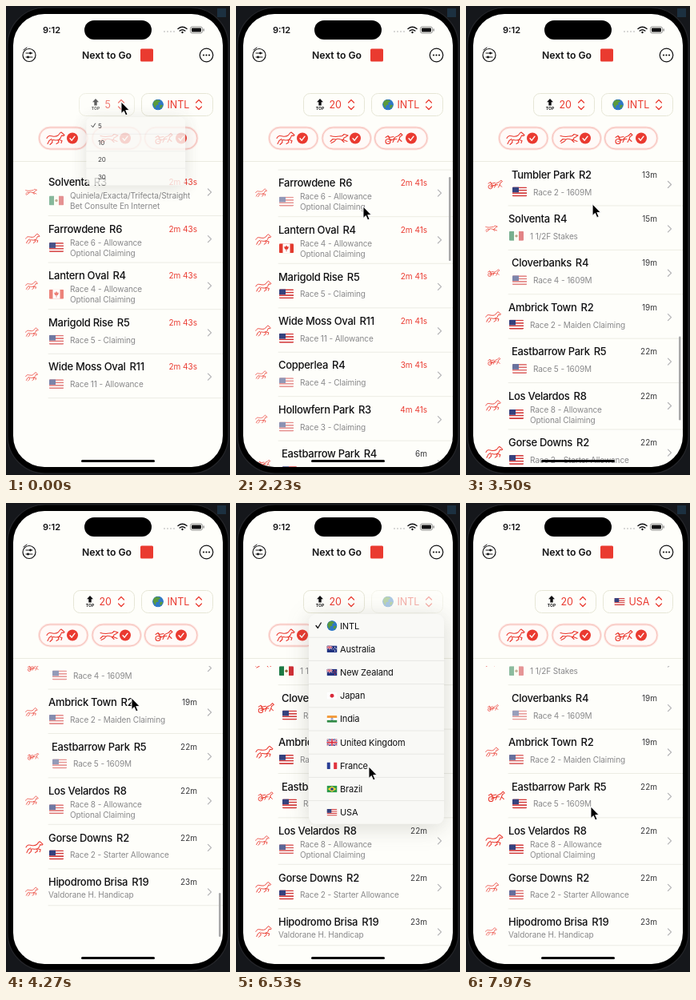
An HTML page that plays this animation: 280 by 587 pixels, repeating every 8 s.

```html
<!DOCTYPE html>
<html lang="en">
<head>
<meta charset="utf-8">
<title>Next to Go</title>
<style>
html, body { margin: 0; width: 100%; height: 100%; overflow: hidden; background: #000; }
svg { display: block; width: 280px; height: 587px; font-family: Inter, Roboto, sans-serif; }
.menu { filter: drop-shadow(0 4px 14px rgba(70, 70, 60, .2)); }
.line { fill: none; stroke-linecap: round; stroke-linejoin: round; }
</style>
</head>
<body>
<svg id="stage" viewBox="0 0 280 587"></svg>
<script>
const LOOP = 8000, PAPER = '#fefefa', INK = '#101012', RED = '#ea3a30', GREY = '#88888a';
const clamp = (v, a = 0, b = 1) => Math.min(b, Math.max(a, v));
const smooth = p => { p = clamp(p); return p * p * (3 - 2 * p); };
const easeOut = p => 1 - (1 - clamp(p)) ** 3;

// ---- drawing helpers ----
const text = (x, y, size, str, attrs = '') =>
  `<text x="${x}" y="${(y + size * .36).toFixed(2)}" font-size="${size}" ${attrs}>${str}</text>`;
const rect = (x, y, w, h, fill, attrs = '') =>
  `<rect x="${x}" y="${y}" width="${w}" height="${h}" fill="${fill}" ${attrs}/>`;
const circle = (x, y, r, fill, attrs = '') => `<circle cx="${x}" cy="${y}" r="${r}" fill="${fill}" ${attrs}/>`;
const line = (d, color, width = 1, attrs = '') =>
  `<path class="line" d="${d}" stroke="${color}" stroke-width="${width}" ${attrs}/>`;
const group = (x, y, body, attrs = '') => `<g transform="translate(${x} ${y})" ${attrs}>${body}</g>`;

// Flags are 18 x 12, centred on the origin.
const bars = (colors, upright) => colors.map((c, i) => {
  const n = colors.length;
  return upright ? rect(-9 + i * 18 / n, -6, 18 / n + .05, 12, c) : rect(-9, -6 + i * 12 / n, 18, 12 / n + .05, c);
}).join('');
const jack = rect(-9, -6, 18, 12, '#25358a') +
  line('M-9-6L9 6M9-6L-9 6', '#fff', 2.6) + line('M-9-6L9 6M9-6L-9 6', '#d8283a', 1) +
  line('M0-6V6M-9 0H9', '#fff', 4) + line('M0-6V6M-9 0H9', '#d8283a', 2.2);
const ensign = star => rect(-9, -6, 18, 12, '#1f3280') +
  `<g transform="translate(-4.5 -3) scale(.5)">${jack}</g>` +
  circle(5, -3, 1, star) + circle(3, 0, .9, star) + circle(7, -.5, .9, star) + circle(5, 3.5, 1, star);
const FLAGS = {
  us: bars('#d33a3a #fff #d33a3a #fff #d33a3a #fff #d33a3a'.split(' ')) + rect(-9, -6, 8, 6.8, '#34417e'),
  mx: bars(['#1c7a45', '#fbfbf0', '#cf2f35'], true) + circle(0, 0, 1.7, '#8a6a3a'),
  ca: rect(-9, -6, 18, 12, '#e23a2e') + rect(-4.5, -6, 9, 12, '#fff') +
    '<path d="M0-4L1-2 3-2 2 1 .4 1.6V4H-.4V1.6L-2 1-3-2-1-2Z" fill="#e23a2e"/>',
  ar: bars(['#7fb6e0', '#fff', '#7fb6e0']) + circle(0, 0, 1.5, '#e8b13a'),
  au: ensign('#fff'),
  nz: ensign('#e0404a'),
  jp: rect(-9, -6, 18, 12, '#fff') + circle(0, 0, 3.4, '#d92a3a'),
  in: bars(['#f39a3a', '#fff', '#2f8a45']) + circle(0, 0, 1.6, 'none', 'stroke="#2a3a90" stroke-width=".8"'),
  gb: jack,
  fr: bars(['#2b3f95', '#fff', '#e0343f'], true),
  br: rect(-9, -6, 18, 12, '#2c9a4a') + '<path d="M0-4.8L7.5 0 0 4.8-7.5 0Z" fill="#f4d33a"/>' + circle(0, 0, 2.6, '#2a3f90'),
  intl: circle(0, 0, 9, '#2f78c8') +
    '<path d="M-6-6C-2-9 3-8 4-5L0-3 1 0-3 1-4 6-7 2-8-2ZM4 0L8 1 5 6 2 4Z" fill="#5a9a3c"/>'
};
const flag = (code, x, y, scale = 1, attrs = '') =>
  `<g ${attrs}><g transform="translate(${x} ${y}) scale(${scale})" clip-path="url(#${code === 'intl' ? 'disc' : 'cloth'})">${FLAGS[code]}</g></g>`;

// Animals are drawn 24 wide, 16 high.
const ANIMALS = {
  horse: 'M1 8C3 4 5 5 8 5.5C11 6 13 6 15 4.5L18 1 19 .5 23 4 22 5 19.5 4.6 18 8 16 10 20 11 19 14M16 10L13 10.5C10 10.5 9 9.5 7.5 10.5L8 13 5 16M7 9L4 11 2 15M15 10L16 13 13 15',
  dog: 'M1 5C4 6 5 6 8 6C11 5 13 6 16 5L18 3 23 4.5 20 6.5 18 7.5 17 10 22 12M17 10L14 9.5C12 9 10 8 8 9.5L4 9 1 12M8 9.5L6 12 2 14M15 10L18 13',
  sulky: 'M9 12A3 3 0 1 1 3 12A3 3 0 1 1 9 12M6 12L14 9H17M3 7L6 5 8 9 11 10M6 5L8 7 13 6M13 9C14 6 17 6 19 5L22 2 24 4 21 6 20 9 23 12M14 9L12 13M20 9L18 13'
};
const animal = (kind, width = 1) => group(0, -8, line(ANIMALS[kind], RED, width));
const arrows = x => line(`M${x - 3.5} 121l3.5-3.5 3.5 3.5M${x - 3.5} 126l3.5 3.5 3.5-3.5`, RED, 1.2);

// ---- list rows: name, race, animal, flag, time, lines, pulse seconds, pulse degrees ----
const ROWS = [
  ['Solventa', 'R3', 'dog', 'mx', 163, 'Quiniela/Exacta/Trifecta/Straight|Bet Consulte En Internet', 12, 70],
  ['Farrowdene', 'R6', 'horse', 'us', 163, 'Race 6 - Allowance|Optional Claiming', 12, 142],
  ['Lantern Oval', 'R4', 'horse', 'ca', 163, 'Race 4 - Allowance|Optional Claiming', 12, 5],
  ['Marigold Rise', 'R5', 'horse', 'us', 163, 'Race 5 - Claiming', 14, 10],
  ['Wide Moss Oval', 'R11', 'horse', 'us', 163, 'Race 11 - Allowance', 14, 20],
  ['Copperlea', 'R4', 'horse', 'us', 223, 'Race 4 - Claiming', 5, 60],
  ['Hollowfern Park', 'R3', 'horse', 'us', 283, 'Race 3 - Claiming', 5, 0],
  ['Eastbarrow Park', 'R4', 'sulky', 'us', '6m', 'Race 4 - 1609M', 5, -30],
  ['San Orvelo', 'R16', 'horse', 'ar', '7m', 'Race 16 - Premio Tan|Serena 2019', 5, 16],
  ['Quillby Raceway', 'R2', 'sulky', 'us', '9m', 'Race 2 - 1609M', 5, 130],
  ['Philomelle Downs', 'R3', 'horse', 'us', '11m', 'Race 3 - Allowance|Optional Claiming', 5, 12],
  ['Heather Hollows', 'R2', 'horse', 'us', '12m', 'Race 2 - Allowance', 6, 140],
  ['Tumbler Park', 'R2', 'sulky', 'us', '13m', 'Race 2 - 1609M', 6, 30],
  ['Solventa', 'R4', 'dog', 'mx', '15m', '1 1/2F Stakes', 4, 150],
  ['Cloverbanks', 'R4', 'sulky', 'us', '19m', 'Race 4 - 1609M', 4, 159],
  ['Ambrick Town', 'R2', 'horse', 'us', '19m', 'Race 2 - Maiden Claiming', 4, -139],
  ['Eastbarrow Park', 'R5', 'sulky', 'us', '22m', 'Race 5 - 1609M', 6, -160],
  ['Los Velardos', 'R8', 'horse', 'us', '22m', 'Race 8 - Allowance|Optional Claiming', 6, -120],
  ['Gorse Downs', 'R2', 'horse', 'us', '22m', 'Race 2 - Starter Allowance', 12, 0],
  ['Hipodromo Brisa', 'R19', 'horse', '', '23m', 'Valdorane H. Handicap', 4.5, 125]
].map(([name, race, kind, code, time, subs, period, phase]) =>
  ({ name, race, kind, code, time, subs: subs.split('|'), period, phase }));

let rowY = 220.5;
for (const r of ROWS) {
  r.y = rowY;
  rowY += r.subs.length > 1 ? 58.6 : 55.4;
}

const rowMarkup = r => {
  const x = r.kind === 'sulky' ? 57 : 53, two = r.subs.length > 1;
  const first = two ? 17 : r.code ? 22 : 16.5;
  const rule = !r.code ? 29.5 : two ? 42 : 39;
  return group(0, r.y,
    `<g class="icon">${animal(r.kind, 1.1)}</g>` +
    text(x, 0, 13, `${r.name}<tspan dx="5">${r.race}</tspan>`, `fill="${INK}" font-weight="500" letter-spacing="-.3"`) +
    text(239, 0, 10, r.time, `class="time" text-anchor="end" fill="${r.time > 0 ? RED : '#3a3a3c'}"`) +
    (r.code ? flag(r.code, x + 10, two ? 23 : 21.5, 1, 'class="flag"') : '') +
    r.subs.map((s, i) => text(r.code ? x + 27 : x, first + i * 13, 10, s, `fill="${GREY}" letter-spacing="-.1"`)).join('') +
    line('M252.5 8.5l4 4-4 4', '#b4b4b6', 1.2) +
    line(`M53 ${rule}H271`, '#ececE4', 1), 'class="row"');
};

// ---- menus ----
const ITEM = 29.2;
const menuMarkup = (id, items) => `<g id="${id}" class="menu">` +
  rect(91, 139, 169, ITEM * items.length, '#f9f9f6', 'rx="9"') +
  line('M100 153.5l2.3 3 4-6.5', INK, 1.3) +
  items.map(([label, code], i) => {
    const y = 139 + ITEM * (i + .5);
    return (i ? line(`M91 ${y - ITEM / 2}H260`, '#e4e4e0', .8) : '') +
      (code ? flag(code, 120, y, .72) : '') +
      text(code ? 130 : 111, y, 11, label, `fill="${INK}" letter-spacing="-.15"`);
  }).join('') + '</g>';

const pill = (x, w, kind, ix, cx) =>
  rect(x, 152, w, 27, '#fffaf8', 'rx="13.5" stroke="#fde6e2" stroke-width="3"') +
  rect(x, 152, w, 27, 'none', 'rx="13.5" stroke="#f4b4ac" stroke-width=".8"') +
  group(ix, 165.5, animal(kind, 1.1)) + circle(cx, 165.5, 7, RED) +
  line(`M${cx - 3} 165.8l2.2 2.4 3.8-5`, '#fff', 1.4);

const BOX = 'rx="8" stroke="#e6e6d6"';
const label = (id, x, str) => text(x, 123.5, 12.5, str, `id="${id}" fill="${RED}"`);
const country = (id, x, code, scale, name) => `<g id="${id}">` +
  rect(x, 109.5, 258.5 - x, 28, PAPER, BOX) + flag(code, x + 20.5, 123.5, scale) +
  label(id + 'Text', x + 32, name) + arrows(241) + '</g>';

const header =
  text(46, 30.5, 11, '9:12', `fill="${INK}" font-weight="600"`) +
  rect(98, 18, 84, 24, '#000', 'rx="12"') +
  [198, 202, 206, 210].map(x => circle(x, 32, .8, '#a8a8a8')).join('') +
  line('M215 28.5Q220.5 24 226 28.5M217.2 31Q220.5 28.3 223.8 31', INK, 1.5) + circle(220.5, 33, 1.2, INK) +
  rect(230.5, 26, 15, 8, 'none', 'rx="2.3" stroke="#777" stroke-width=".8"') +
  rect(232, 27.5, 12, 5, INK, 'rx="1"') + rect(246.5, 28.5, 1.2, 3, '#777') +
  circle(29, 61.5, 8, 'none', `stroke="${INK}" stroke-width="1.2"`) +
  line('M25 59H33M25 64H33M22 55l4-3', INK, 1) + circle(30.5, 59, 1.4, INK) + circle(27.5, 64, 1.4, INK) +
  text(95, 61.5, 12.2, 'Next to Go', `fill="${INK}" font-weight="600"`) +
  rect(168, 53.5, 16, 16, RED, 'rx="1.5"') +
  circle(250.5, 61.5, 8.3, 'none', `stroke="${INK}" stroke-width="1.2"`) +
  [247, 250.5, 254].map(x => circle(x, 61.5, 1.1, INK)).join('') +
  `<g id="count"><rect id="countBox" y="109.5" height="28" fill="${PAPER}" ${BOX}/>` +
  `<g id="countIcon"><path d="M0 116l4 4.3h-2.3v4.2h-3.4v-4.2h-2.3z" fill="${INK}"/>` +
  text(0, 128, 5, 'TOP', `text-anchor="middle" font-weight="700" fill="${INK}"`) + '</g>' +
  label('countText', 0, '5') + arrows(144) + '</g>' +
  country('world', 169.5, 'intl', .78, 'INTL') + country('usa', 171.5, 'us', .74, 'USA') +
  pill(41.5, 60.5, 'horse', 50, 83) + pill(108, 60.5, 'dog', 117, 149) + pill(173.5, 65.5, 'sulky', 184, 219) +
  line('M9 194.5H271', '#ebebe0', 1);

const stage = document.getElementById('stage');
stage.innerHTML = `<defs>
  <clipPath id="cloth"><rect x="-9" y="-6" width="18" height="12" rx="1.3"/></clipPath>
  <clipPath id="disc"><circle r="9"/></clipPath>
  <clipPath id="screen"><rect x="9" y="10" width="262" height="567" rx="39"/></clipPath>
  <clipPath id="view"><rect x="9" y="204" width="262" height="373"/></clipPath>
</defs>` +
  rect(0, 0, 280, 587, '#15171b') + rect(264, 3, 11, 11, '#1c3040') +
  rect(2, 2, 276, 583, '#000', 'rx="47" stroke="#25262a" stroke-width="1.2"') +
  rect(9, 10, 262, 567, PAPER, 'rx="39"') +
  '<g clip-path="url(#screen)">' +
  `<g clip-path="url(#view)"><g id="list">${ROWS.map(rowMarkup).join('')}</g></g>` +
  rect(266, 0, 2.5, 0, '#a9a9aa', 'id="bar" rx="1.2"') +
  header +
  menuMarkup('countMenu', [['5'], ['10'], ['20'], ['30']]) +
  menuMarkup('worldMenu', [['INTL', 'intl'], ['Australia', 'au'], ['New Zealand', 'nz'], ['Japan', 'jp'], ['India', 'in'],
    ['United Kingdom', 'gb'], ['France', 'fr'], ['Brazil', 'br'], ['USA', 'us']]) +
  rect(94, 568, 92, 3, '#000', 'rx="1.5"') + '</g>' +
  '<path id="cursor" d="M0 0V14.5L3.3 11.5 5.6 16.8 8 15.8 5.7 10.6H10.2Z" fill="#000" stroke="#fff" stroke-width=".9"/>';

const ui = {};
stage.querySelectorAll('[id]').forEach(el => { ui[el.id] = el; });
const rowEls = [...stage.querySelectorAll('.row')];
ROWS.forEach((r, i) => {
  r.el = rowEls[i];
  for (const part of ['icon', 'time', 'flag']) r[part + 'El'] = r.el.querySelector('.' + part);
});
const set = (el, attrs) => { for (const k in attrs) el.setAttribute(k, attrs[k]); };

// ---- motion ----
const SCROLL = [[2000, 0], [2400, 130], [2830, 354], [3500, 690], [3950, 808], [4270, 818], [4850, 768], [5000, 768]];
const POINTER = [[0, 144, 120], [250, 144, 120], [800, 137, 211], [1370, 135, 211], [1500, 135, 211], [1950, 159, 251],
  [2830, 159, 251], [4270, 157, 244], [4650, 157, 244], [5300, 213, 118], [6050, 213, 118], [6530, 166, 330],
  [6950, 156, 380], [LOOP, 156, 380]];

// Cubic through the keys, flat at both ends.
function curve(keys, t) {
  const n = keys.length - 1;
  if (t <= keys[0][0]) return keys[0][1];
  if (t >= keys[n][0]) return keys[n][1];
  const i = keys.findIndex(k => k[0] > t) - 1;
  const slope = j => {
    if (j <= 0 || j >= n) return 0;
    const a = (keys[j][1] - keys[j - 1][1]) / (keys[j][0] - keys[j - 1][0]);
    const b = (keys[j + 1][1] - keys[j][1]) / (keys[j + 1][0] - keys[j][0]);
    return a * b <= 0 ? 0 : 2 * a * b / (a + b);
  };
  const [t0, a] = keys[i], [t1, b] = keys[i + 1], h = t1 - t0, u = (t - t0) / h;
  return a + (b - a) * u * u * (3 - 2 * u) + h * u * (1 - u) * (slope(i) * (1 - u) - slope(i + 1) * u);
}

function pointer(t) {
  const i = Math.max(1, POINTER.findIndex(k => k[0] >= t));
  const [t0, x0, y0] = POINTER[i - 1], [t1, x1, y1] = POINTER[i];
  const p = smooth((t - t0) / (t1 - t0));
  return [x0 + (x1 - x0) * p, y0 + (y1 - y0) * p];
}

function showMenu(el, x, t, start, end) {
  const k = t < start ? 0 : easeOut((t - start) / 350) * (1 - smooth((t - end) / 260));
  const s = .3 + .7 * k;
  set(el, {
    transform: `translate(${x} 139) scale(${s}) translate(${-x} -139)`,
    opacity: Math.min(1, k * 1.3), visibility: k > 0 ? 'visible' : 'hidden'
  });
  return k;
}

const clock = s => `${Math.floor(s / 60)}m ${s % 60}s`;

function draw(t) {
  const scroll = curve(SCROLL, t), ticks = Math.floor((t + 700) / 1000);
  set(ui.list, { transform: `translate(0 ${-scroll})` });
  ROWS.forEach((r, i) => {
    const pulse = .5 + .5 * Math.cos(2 * Math.PI * (t - 4270) / (r.period * 1000) - r.phase * Math.PI / 180);
    set(r.el, { visibility: i < 5 || t >= 1600 ? 'visible' : 'hidden' });
    set(r.iconEl, { transform: `translate(${r.kind === 'sulky' ? 25.5 : 24} 12) scale(${(15 + 8 * pulse) / 24})` });
    if (r.flagEl) set(r.flagEl, { opacity: clamp(.5 + .8 * pulse) });
    if (r.time > 0) r.timeEl.textContent = clock(r.time - ticks);
  });

  const over = Math.max(0, scroll - 768), len = 105 - over;
  set(ui.bar, {
    y: 196 + Math.min(scroll, 768) / 768 * 242 + over, height: len,
    opacity: smooth((t - 2000) / 150) * (1 - smooth((t - 5850) / 250))
  });

  const k1 = showMenu(ui.countMenu, 126, t, -95, 880);
  const k2 = showMenu(ui.worldMenu, 214, t, 5860, 7080);
  const usa = t >= 7150, x = 112 - 7 * smooth((t - 950) / 180);
  set(ui.count, { opacity: 1 - .55 * k1, transform: `translate(${usa ? 2 : 0} 0)` });
  set(ui.countBox, { x: x - 20.5, width: 181 - x });
  set(ui.countIcon, { transform: `translate(${x} 0)` });
  set(ui.countText, { x: x + 11.5 });
  ui.countText.textContent = t < 950 ? '5' : '20';
  set(ui.world, { opacity: 1 - .6 * k2, visibility: usa ? 'hidden' : 'visible' });
  set(ui.usa, { opacity: 1 - .6 * k2, visibility: usa ? 'visible' : 'hidden' });
  set(ui.cursor, { transform: `translate(${pointer(t).join(' ')})` });
}

const begin = performance.now();
function frame() {
  draw((performance.now() - begin) % LOOP);
  requestAnimationFrame(frame);
}
frame();
</script>
</body>
</html>
```
